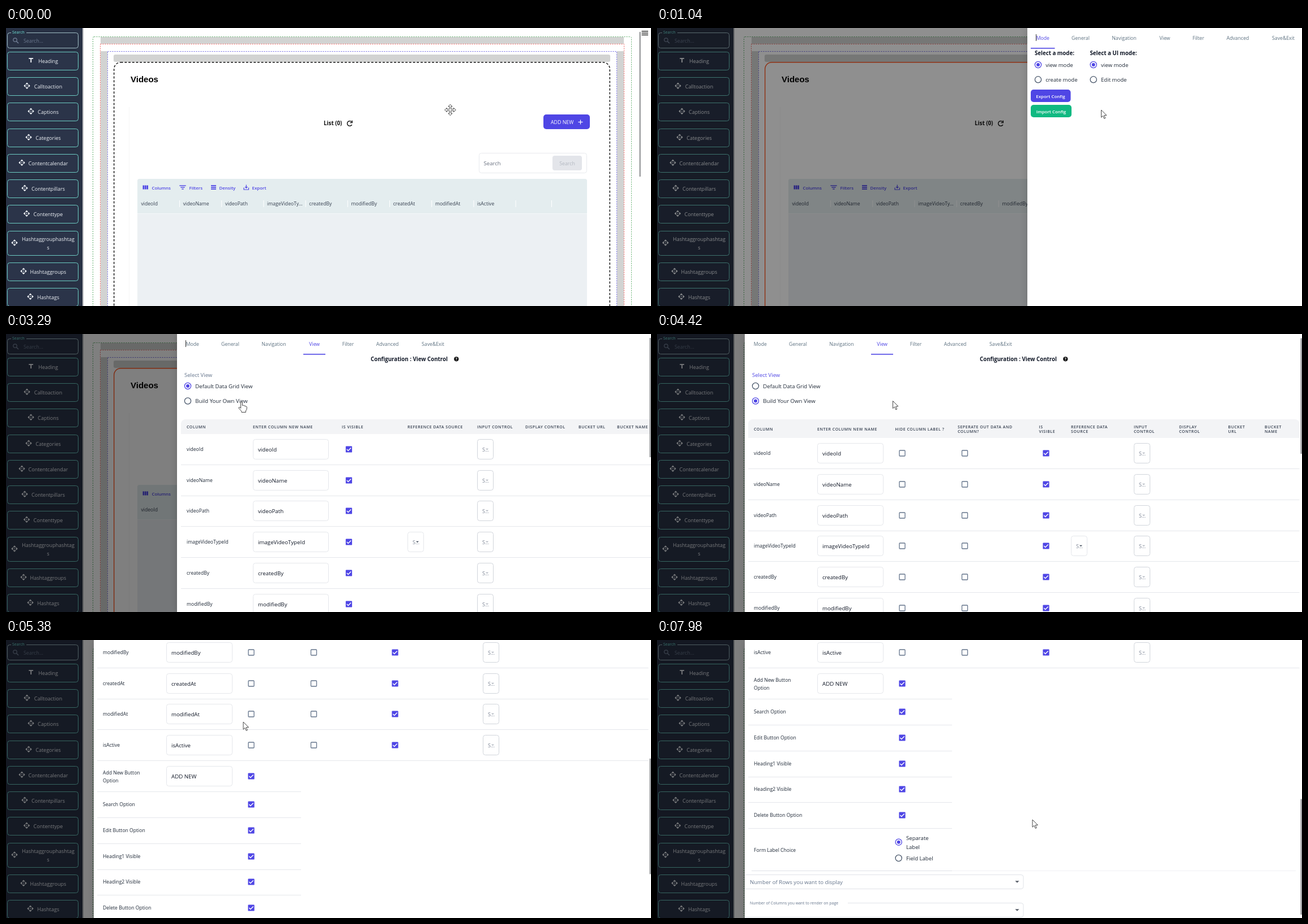
An HTML page with a canvas that plays this animation: 1139 px wide and 492 px high, repeating every 8 s.

```html
<!DOCTYPE html>
<html lang="en">
<head>
<meta charset="utf-8">
<title>Page builder</title>
<style>
html, body { margin: 0; width: 100%; height: 100%; overflow: hidden; background: #fff; }
canvas { display: block; width: 1139px; height: 492px; }
</style>
</head>
<body>
<canvas id="stage"></canvas>
<script>
const W = 1139, H = 492, LOOP = 8000;
const canvas = document.getElementById('stage');
const dpr = window.devicePixelRatio || 1;
canvas.width = W * dpr;
canvas.height = H * dpr;
const c = canvas.getContext('2d');

const SANS = '"Open Sans", "Noto Sans", sans-serif';
const INDIGO = '#4f46e5', INK = '#1f2937', SLATE = '#64748b', EDGE = '#e5e7eb';
const FIELDS = ['videoId', 'videoName', 'videoPath', 'imageVideoTypeId', 'createdBy',
  'modifiedBy', 'createdAt', 'modifiedAt', 'isActive'];
const PITCH = 54.7;

// ---------- helpers ----------
const clamp = v => Math.max(0, Math.min(1, v));
const smooth = p => p * p * (3 - 2 * p);
const easeOut = p => 1 - (1 - p) ** 4;
const span = (t, a, b) => clamp((t - a) / (b - a));

// Smooth curve through rows of [time, x, y]; it rests wherever a value repeats.
function track(keys, t) {
  const last = keys.length - 1;
  const i = keys.findIndex(k => k[0] > t);
  if (i <= 0) return keys[i < 0 ? last : 0].slice(1);
  const a = keys[i - 1], b = keys[i], len = b[0] - a[0], p = (t - a[0]) / len;
  const slope = (n, k) => {
    if (n <= 0 || n >= last) return 0;
    const [u, v, w] = [keys[n - 1], keys[n], keys[n + 1]];
    const before = v[k] - u[k], after = w[k] - v[k];
    return before * after <= 0 ? 0 : (before + after) / (w[0] - u[0]);
  };
  return [1, 2].map(k => a[k] + (b[k] - a[k]) * smooth(p)
    + len * p * (1 - p) * (slope(i - 1, k) * (1 - p) - slope(i, k) * p));
}

// y is the middle of the capitals
function text(s, x, y, size, color = INK, { weight = 400, align = 'left', font = SANS, gap = 0 } = {}) {
  c.font = `${weight} ${size}px ${font}`;
  c.textAlign = align;
  c.letterSpacing = gap + 'px';
  c.fillStyle = color;
  c.fillText(s, x, Math.round(y + size * 0.36));
}

function rect(x0, y0, x1, y1, color) {
  c.fillStyle = color;
  c.fillRect(x0, y0, x1 - x0, y1 - y0);
}

function box(x0, y0, x1, y1, r, fill, stroke, width = 1, dash = []) {
  c.beginPath();
  c.roundRect(x0, y0, x1 - x0, y1 - y0, r);
  if (fill) { c.fillStyle = fill; c.fill(); }
  if (stroke) {
    c.strokeStyle = stroke;
    c.lineWidth = width;
    c.setLineDash(dash);
    c.stroke();
    c.setLineDash([]);
  }
}

function poly(points, close) {
  c.beginPath();
  points.forEach(([x, y], i) => i ? c.lineTo(x, y) : c.moveTo(x, y));
  if (close) c.closePath();
}

function line(points, color, width = 1) {
  poly(points);
  c.strokeStyle = color;
  c.lineWidth = width;
  c.stroke();
}

function disc(x, y, r, color) {
  c.beginPath();
  c.arc(x, y, r, 0, 7);
  c.fillStyle = color;
  c.fill();
}

function ring(x, y, r, color, width = 1.2, from = 0, to = 2 * Math.PI) {
  c.beginPath();
  c.arc(x, y, r, from, to);
  c.strokeStyle = color;
  c.lineWidth = width;
  c.stroke();
}

function caretDown(x, y, r, color) {
  poly([[x - r, y - r / 2], [x + r, y - r / 2], [x, y + r / 2]], true);
  c.fillStyle = color;
  c.fill();
}

// ---------- controls ----------
function radio(x, y, on) {
  ring(x, y, 5.6, on ? INDIGO : '#475569', 1.3);
  if (on) disc(x, y, 3, INDIGO);
}

function checkbox(x, y, on) {
  if (!on) return box(x - 5, y - 5, x + 5, y + 5, 1, null, '#64748b', 1.3);
  box(x - 5.6, y - 5.6, x + 5.6, y + 5.6, 1.2, INDIGO);
  line([[x - 3.7, y], [x - 1.2, y + 2.6], [x + 3.7, y - 2.5]], '#fff', 1.4);
}

function input(x0, x1, y, value) {
  box(x0 + 0.5, y - 17.5, x1 - 0.5, y + 17.5, 4, '#fff', EDGE);
  text(value, x0 + 9, y + 0.5, 9.7, '#111827');
}

function miniSelect(x, y, dark) {
  box(x + 0.5, y - 17.5, x + 28.5, y + 17.5, 4, '#fff', dark ? EDGE : '#d1d5db');
  text('S...', x + 9, y + 0.5, 9, '#7b8494');
  caretDown(x + 17.5, y, 2.6, dark ? '#4b5563' : '#b4b9c2');
}

// ---------- sidebar ----------
function apiIcon(x, y) {
  c.save();
  c.translate(x, y);
  c.scale(0.52, 0.52);
  c.fillStyle = '#eef2f6';
  for (let i = 0; i < 4; i++) {
    poly([[0, -6], [2.1, -3.9], [4.6, -6.4], [0, -11], [-4.6, -6.4], [-2.1, -3.9]], true);
    c.fill();
    c.rotate(Math.PI / 2);
  }
  poly([[2, 0], [0, 2], [-2, 0], [0, -2]], true);
  c.fill();
  c.restore();
}

function sidebar() {
  const bg = '#283144', teal = '#6ccbc2';
  rect(0, 0, 135, H, bg);
  rect(135, 0, 137, H, '#b9bbbe');
  box(2.5, 8.5, 127.5, 35.5, 4, null, '#a0bec5');
  rect(9, 5, 36, 12, bg);
  text('Search', 11, 8, 6.9, '#6fe0d5');
  ring(16, 21, 3.2, '#76839a', 1.2);
  line([[18.4, 23.4], [22, 27]], '#76839a', 1.4);
  text('Search...', 31, 22.5, 8.8, '#6b788e');

  const items = [['Heading', 42.5, 44], ['Calltoaction', 87.5, 37], ['Captions', 132.5, 44],
    ['Categories', 178.5, 40], ['Contentcalendar', 223.5, 28], ['Contentpillars', 268.5, 33],
    ['Contenttype', 313.5, 36.5], ['Hashtaggrouphashtag', 359.5, 15],
    ['Hashtaggroups', 415.5, 31], ['Hashtags', 460.5, 43]];
  items.forEach(([name, y, iconX], i) => {
    const tall = i === 7;
    box(2.5, y, 127.5, y + (tall ? 43 : 32), 4, '#2b3449', teal);
    const ty = y + (tall ? 14 : 16.5);
    text(name, 74.5, ty, 9, '#eef2f6', { align: 'center' });
    if (tall) text('s', 74.5, ty + 15.5, 9, '#eef2f6', { align: 'center' });
    if (i) apiIcon(iconX, tall ? y + 20.5 : ty - 1.7);
    else {
      rect(40.3, 53, 48, 54.8, '#eef2f6');
      rect(43.2, 53, 45.1, 61, '#eef2f6');
    }
  });
}

// ---------- page behind ----------
function toolbarIcons() {
  for (let i = 0; i < 3; i++) {
    rect(241.5 + i * 3.4, 278.5, 244.2 + i * 3.4, 285.5, INDIGO);
    rect(362, 278 + i * 3, 371, 279.8 + i * 3, INDIGO);
    rect(306.3 + i * 2, 278.3 + i * 3, 317.7 - i * 2, 279.7 + i * 3, INDIGO);
  }
  line([[420, 282.5], [420, 286], [428.5, 286], [428.5, 282.5]], INDIGO, 1.2);
  line([[424.3, 277.5], [424.3, 283]], INDIGO, 1.2);
  line([[422.2, 281], [424.3, 283.2], [426.4, 281]], INDIGO, 1.2);
}

function page(selected) {
  const band = '#d2d3d2';
  rect(137, 0, W, H, '#fff');
  rect(167, 16, 1091, 28, band);
  rect(167, 41, 179, H, band);
  rect(1079, 41, 1091, H, band);
  box(153.5, 15.5, 1104.5, 520, 2, null, '#5fae6b', 1, [2, 2]);
  box(166.5, 28.5, 1091.5, 520, 0, null, '#f0625f', 1, [2, 2]);
  box(179.5, 41.5, 1078.5, 520, 0, null, '#6a63e0', 1, [2, 2]);
  box(190, 47, 1067, 60, 3, band);
  if (selected) box(190.7, 60.7, 1066.3, 540, 12, '#fff', '#ff5722', 1.4);
  else box(190.7, 60.7, 1066.3, 540, 12, '#fff', '#111', 1.4, [4, 2.7]);
  rect(217, 140, 218, H, '#f7f7f7');

  text('Videos', 220, 91, 15, '#000', { weight: 700, font: '"Liberation Sans", Arial, sans-serif' });
  text('List (0)', 561, 168, 9.8, '#111', { weight: 700 });
  ring(607, 169, 4.4, '#111', 1.4, 0.5, 5.6);
  line([[611.3, 163.8], [611.3, 167.6], [607.4, 167.6]], '#111', 1.4);

  box(949, 153, 1031, 179, 5, INDIGO);
  text('ADD NEW', 962, 167, 8.8, '#fff', { weight: 500 });
  line([[1010.5, 166.5], [1018.5, 166.5]], '#fff', 1.2);
  line([[1014.5, 162.5], [1014.5, 170.5]], '#fff', 1.2);

  box(835.5, 221.5, 1025.5, 256.5, 4, '#fff', '#e8eaee');
  text('Search', 843.5, 239.5, 9.6, '#6b7280');
  box(965, 226, 1017, 252, 4, '#e3e5ea');
  text('Search', 991, 239.5, 8.8, '#b3b8c1', { align: 'center' });

  box(232, 267, 1026, 520, [4, 4, 0, 0], '#ecf0f3');
  box(232, 267, 1026, 328.5, [4, 4, 0, 0], '#e4edef');
  rect(232, 328, 1026, 329, '#f5f8f9');
  toolbarIcons();
  [['Columns', 257.5], ['Filters', 323.5], ['Density', 376.5], ['Export', 434.5]]
    .forEach(([s, x]) => text(s, x, 283, 7.9, INDIGO, { weight: 600 }));
  FIELDS.forEach((f, i) => {
    const name = i === 3 ? 'imageVideoTy...' : f;
    text(name, 238.5 + i * 74.2, 311, 8.6, '#374151');
    rect(306 + i * 74.2, 305, 307 + i * 74.2, 317, '#fff');
  });
  rect(963, 305, 964, 317, '#fff');

  rect(1118.7, 7, 1120.5, 263, '#7d7f82');
  for (let i = 0; i < 3; i++) rect(1122.5, 5 + i * 3.3, 1134, 6.4 + i * 3.3, '#222');
}

// ---------- drawer ----------
const TABS = [['Mode', 27.3], ['General', 94], ['Navigation', 171], ['View', 242.7],
  ['Filter', 302], ['Advanced', 371.5], ['Save&Exit', 452]];

function tabs(x, active, slide) {
  TABS.forEach(([s, dx], i) => text(s, x + dx, 17.5, 8.7, i === active ? INDIGO : '#5d7180',
    { align: 'center' }));
  const left = 6 + (223 - 6) * slide, width = 42.5 - 3.5 * slide;
  rect(x + left, 35, x + left + width, 36.6, INDIGO);
}

function modePanel(x) {
  text('Select a mode:', x + 13, 44.7, 9.7, '#111827', { weight: 700 });
  text('Select a UI mode:', x + 110.5, 44.7, 9.7, '#111827', { weight: 700 });
  [[19, 'view mode', 'create mode'], [116.7, 'view mode', 'Edit mode']].forEach(([dx, a, b]) => {
    radio(x + dx, 65, true);
    radio(x + dx, 91.3, false);
    text(a, x + dx + 13.3, 66, 9.6);
    text(b, x + dx + 13.3, 92, 9.6);
  });
  box(x + 6, 109, x + 76.5, 131, 5, INDIGO);
  text('Export Config', x + 41, 121.3, 7.9, '#fff', { weight: 600, align: 'center' });
  box(x + 6, 136, x + 78, 158, 5, '#10b981');
  text('Import Config', x + 42, 148.3, 7.9, '#fff', { weight: 600, align: 'center' });
}

function viewTop(x, titleX, own, focus) {
  text('Configuration : View Control', titleX, 44.7, 9.7, '#111827', { weight: 700 });
  disc(titleX + 151.3, 44.3, 4.1, '#111');
  text('?', titleX + 151.3, 44.3, 6.5, '#fff', { weight: 700, align: 'center' });
  text('Select View', x + 13, 72.5, 9.5, focus ? INDIGO : SLATE);
  radio(x + 19, 92, !own);
  radio(x + 19, 118.5, own);
  text('Default Data Grid View', x + 32.3, 92.7, 9.6);
  text('Build Your Own View', x + 32.3, 119, 9.6);
}

function heads(list, y) {
  for (const [label, x] of list) {
    const rows = label.split('|');
    rows.forEach((s, i) => text(s, x, y + (i - (rows.length - 1) / 2) * 7.4, 7, '#374151',
      { weight: 600, gap: 0.55 }));
  }
}

function fieldRows(first, end, col) {
  FIELDS.forEach((f, i) => {
    const y = Math.round(first + i * PITCH);
    text(f, col.label, y, 8.6);
    input(col.input, col.inputEnd, y, f);
    (col.empty || []).forEach(x => checkbox(x, y, false));
    checkbox(col.check, y, true);
    if (i === 3) miniSelect(col.ref, y, true);
    miniSelect(col.select, y, false);
    rect(col.left, y + 27, end, y + 28, EDGE);
  });
}

function gridView() {
  box(309, 151, W + 10, 177, [8, 0, 0, 0], '#f3f4f6');
  heads([['COLUMN', 319], ['ENTER COLUMN NEW NAME', 436], ['IS VISIBLE', 593],
    ['REFERENCE DATA SOURCE', 709], ['INPUT CONTROL', 832], ['DISPLAY CONTROL', 917],
    ['BUCKET URL', 1011], ['BUCKET NAME', 1079]], 164.5);
  fieldRows(204, W, { left: 309, label: 319, input: 436, inputEnd: 570, check: 605.5, ref: 709, select: 832 });
  rect(1136.6, 7, 1138.5, 218, '#808285');
}

function bigSelect(y, hover, label) {
  box(153.5, y, 647, y + 25, 4, null, hover ? '#374151' : '#e0e3e8');
  caretDown(636, y + 12.5, 3.6, '#555b66');
  if (label) {
    rect(155, y - 2, 337, y + 2, '#fff');
    text(label, 164, y - 0.2, 6.9, SLATE);
  }
}

function ownView(hover) {
  box(161, 151, 1134.5, 184, [8, 8, 0, 0], '#f3f4f6');
  heads([['COLUMN', 171], ['ENTER COLUMN NEW NAME', 283], ['HIDE COLUMN LABEL ?', 420.5],
    ['SEPERATE OUT DATA AND|COLUMN?', 531], ['IS|VISIBLE', 674.5], ['REFERENCE DATA|SOURCE', 731],
    ['INPUT|CONTROL', 842], ['DISPLAY|CONTROL', 922], ['BUCKET|URL', 1008.5],
    ['BUCKET|NAME', 1073]], 168.3);
  fieldRows(211.3, 1134.5, { left: 161, label: 171, input: 283, inputEnd: 400,
    empty: [433, 543.5], check: 687, ref: 731, select: 842 });

  text('Add New Button', 171, 697.5, 8.6);
  text('Option', 171, 711.5, 8.6);
  input(283, 400, 704, 'ADD NEW');
  checkbox(433, 704, true);
  rect(161, 731, 521, 732, EDGE);
  ['Search Option', 'Edit Button Option', 'Heading1 Visible', 'Heading2 Visible', 'Delete Button Option']
    .forEach((s, i) => {
      const y = Math.round(754 + i * 45.8);
      text(s, 171, y + 0.4, 8.6);
      checkbox(433, y, true);
      rect(161, y + 23, 521, y + 24, EDGE);
    });

  text('Form Label Choice', 171, 998.5, 8.6);
  radio(426.7, 984.7, true);
  radio(426.7, 1013, false);
  text('Separate', 440, 978, 9.6);
  text('Label', 440, 993.5, 9.6);
  text('Field Label', 440, 1013.5, 9.6);
  rect(167, 1035, 521, 1036, '#dfe2e7');
  rect(521, 1035, 1128, 1036, '#f0f1f4');
  bigSelect(1042.5, hover === 1);
  text('Number of Rows you want to display', 164, 1056, 9.6, SLATE);
  bigSelect(1092.5, hover === 2, 'Number of Columns you want to render on page');
}

// ---------- pointer ----------
function outlined(points) {
  poly(points, true);
  c.fillStyle = '#fff';
  c.fill();
  c.strokeStyle = '#333';
  c.lineWidth = 0.9;
  c.stroke();
}

function pointer(kind, x, y) {
  c.save();
  c.translate(x, y);
  c.lineJoin = 'round';
  if (kind === 'move') {
    const arm = [[-1.3, -1.3], [-1.3, -6], [-3.6, -6], [0, -9.8], [3.6, -6], [1.3, -6]];
    const all = [];
    for (let i = 0, a = [1, 0]; i < 4; i++, a = [-a[1], a[0]])
      arm.forEach(([px, py]) => all.push([px * a[0] - py * a[1], px * a[1] + py * a[0]]));
    outlined(all);
  } else if (kind === 'hand') {
    outlined([[-1.4, 1], [0, 0], [1.4, 1], [1.4, 6.3], [3.6, 6.2], [4.4, 7.2], [6, 6.9], [6.9, 8],
      [8.4, 8], [9.4, 9.4], [9, 13.4], [7.4, 16], [7.4, 18.5], [0, 18.5], [-0.4, 16.3], [-5.2, 11],
      [-4.4, 9.6], [-2.8, 10], [-1.4, 11.4]]);
  } else {
    outlined([[0, 0], [0, 13.2], [3.1, 10.4], [5.2, 15.4], [7.3, 14.5], [5.2, 9.7], [9.4, 9.5]]);
  }
  c.restore();
}

const PATH = [[0, 784.5, 145], [1080, 784.5, 145], [1310, 800, 90], [1700, 862, 30], [2170, 897, 12],
  [2400, 897, 12], [3160, 419, 120], [3290, 416, 120], [3980, 416, 120], [4160, 416.5, 118.5],
  [4750, 416.5, 118.5], [5100, 419, 145], [5380, 419, 145], [5640, 419, 161], [5940, 419, 161],
  [6300, 364.5, 387], [6560, 400, 436], [6770, 445, 448], [7000, 500, 478], [7300, 585, 462],
  [7580, 632, 395], [7970, 663, 318]];

// two bursts of the wheel
const scrollAt = t => 267 * smooth(span(t, 4720, 5040)) + 360 * smooth(span(t, 5140, 5595));

function caretOn(t) {
  return (t > 900 && t < 1450) || (t > 1950 && t < 2720) || (t >= 3220 && t < 3720);
}

function draw(t) {
  c.setTransform(dpr, 0, 0, dpr, 0, 0);
  const [px, py] = track(PATH, t);
  const onView = t >= 2370, wide = t >= 2430, own = t >= 3980;

  page(t >= 570);
  sidebar();
  const opening = span(t, 600, 1100);
  rect(0, 0, W, H, `rgba(0,0,0,${0.5 * opening})`);

  const x = own ? 155 : wide ? 302 : Math.round(W - (W - 654) * easeOut(opening));
  let hover = 0;
  if (x < W) {
    c.save();
    c.shadowColor = 'rgba(0,0,0,.18)';
    c.shadowBlur = 12 * dpr;
    rect(x, 0, W + 20, H, '#fff');
    c.restore();

    c.save();
    c.beginPath();
    c.rect(x, 0, W - x, H);
    c.clip();
    const scroll = Math.round(scrollAt(t));
    c.translate(0, -scroll);
    tabs(x, onView ? 3 : 0, smooth(span(t, 2370, 2600)));
    if (!wide) modePanel(x);
    else viewTop(x, own ? 570 : 644, t >= 3700, t >= 3700);
    if (own) {
      if (t > 5640 && px < 648) {
        if (py > 416 && py < 441) hover = 1;
        else if (py > 466) hover = 2;
      }
      ownView(hover);
      if (t < 4420) rect(266, 111, 267, 125, '#333');
    } else if (wide) gridView();
    if (caretOn(t)) rect(x + 15, 11, x + 16, 23, '#333');
    c.restore();
    if (own) rect(1136.6, 7.5 + scroll * 0.437, 1138.5, 212 + scroll * 0.437, '#808285');
  }

  const overLink = (t >= 2030 && t < 2470) || (t >= 3090 && t < 4050) || hover;
  pointer(x > px ? 'move' : overLink ? 'hand' : 'arrow', px, py);
}

function tick() {
  draw(performance.now() % LOOP);
  requestAnimationFrame(tick);
}
tick();
</script>
</body>
</html>
```
